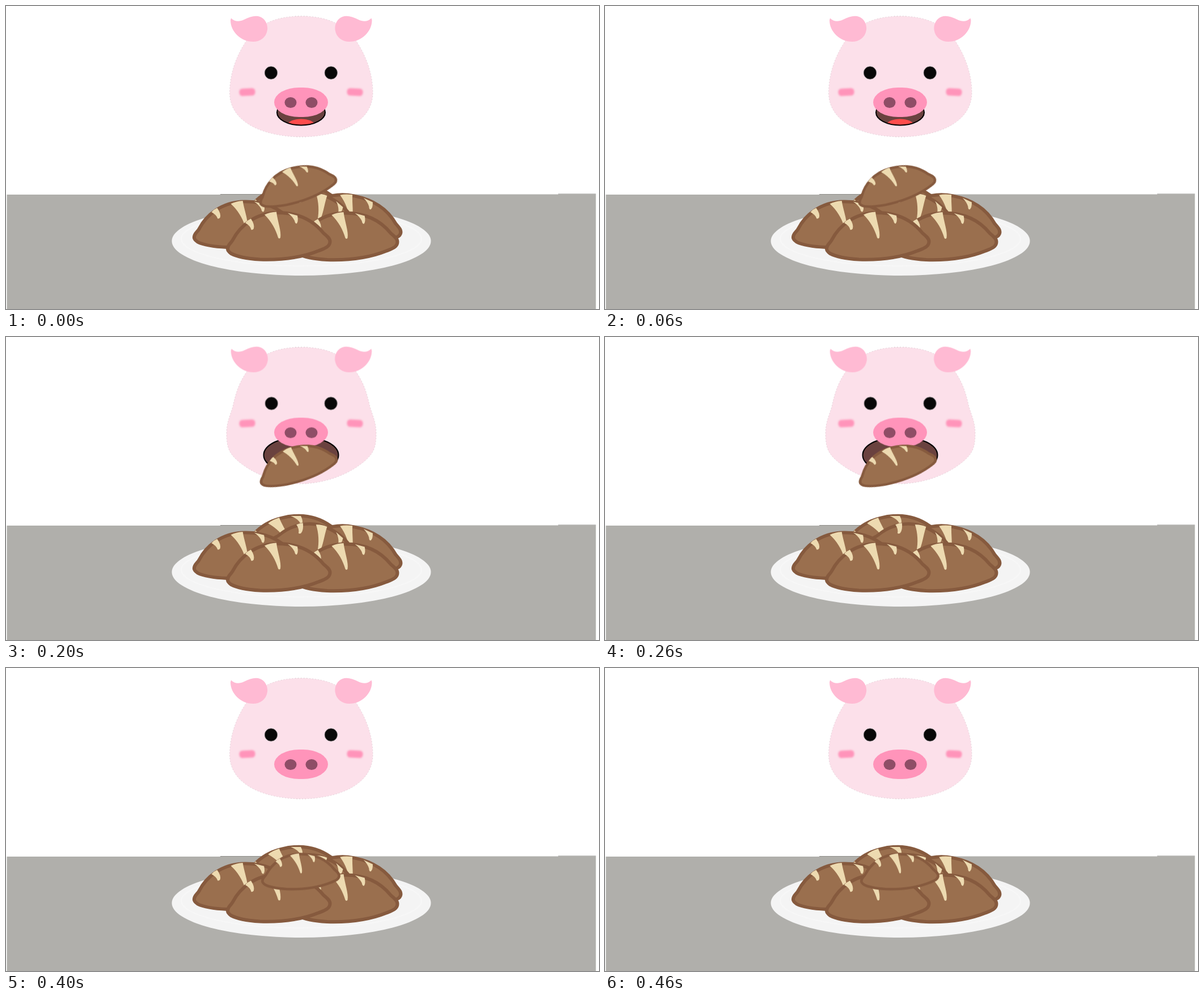
Recreate the animation shown at these times as an HTML page. Size 1046 px wide and 535 px high, loop 500 ms.

```html
<!DOCTYPE html>
<html lang="en">
<head>
<meta charset="utf-8">
<title>Hungry pig</title>
<style>
  html, body { margin: 0; width: 100%; height: 100%; overflow: hidden; background: #fff; }
  svg { display: block; width: 100%; height: 100%; }

  /* Poses: each .pose shows for one 100 ms slot, .rest closes the loop as well */
  .pose { opacity: 0; animation: slot 500ms step-end infinite; animation-delay: calc(var(--i) * 100ms - 500ms); }
  .rest { animation: rest 500ms step-end infinite; }
  .lift { animation: lift 500ms step-end infinite; }
  .left-in { animation: left-in 500ms step-end infinite; }
  .right-in { animation: right-in 500ms step-end infinite; }
  .cheeks { animation: cheeks 500ms step-end infinite; }
  .bread { transform-origin: 482px 411px; }
  .snack { animation: snack 500ms step-end infinite; }

  @keyframes slot { 0% { opacity: 1; } 20%, 100% { opacity: 0; } }
  @keyframes rest { 0% { opacity: 1; } 20% { opacity: 0; } 80%, 100% { opacity: 1; } }
  @keyframes lift { 0%, 80%, 100% { transform: none; } 20% { transform: translateY(-1.5px); } }
  @keyframes left-in { 0%, 80%, 100% { transform: none; } 20% { transform: translate(.7px, -.7px); } }
  @keyframes right-in { 0%, 80%, 100% { transform: none; } 20% { transform: translate(-.3px, -.7px); } }
  @keyframes cheeks { 0%, 80%, 100% { transform: none; } 20% { transform: translateY(.5px); } }
  @keyframes snack {
    0% { transform: translate(32px, -92.3px) rotate(-14deg) scale(.77, .735); }
    20% { transform: translate(30px, -136.3px) rotate(-14deg) scale(.77, .735); }
    40%, 60% { transform: translate(33px, -183.3px) rotate(-14deg) scale(.77, .735); }
    80%, 100% { transform: translate(38.5px, -48px) scale(.75); }
  }

  .skin { fill: #fce0ea; stroke: #b5a3ab; stroke-width: .6; stroke-dasharray: 2 3; stroke-opacity: .6; }
  .ear { fill: #ffbad3; }
  .eye { fill: #080808; stroke: #777; stroke-width: .7; }
  .cheek { fill: #ff94ba; filter: url(#soft); }
  .nostril { fill: #8f4d66; }
  .mouth { fill: #6a423f; }
  .lips { fill: none; stroke: #000; stroke-width: 2; }
  .tongue { fill: #ff4c4c; }
</style>
</head>
<body>
<svg viewBox="0 0 1046 535" preserveAspectRatio="none">
  <defs>
    <filter id="soft" x="-30%" y="-50%" width="160%" height="200%"><feGaussianBlur stdDeviation="1.7"/></filter>

    <g id="bread">
      <path fill="#9a6f4e" stroke="#865a3e" stroke-width="6" stroke-linejoin="round"
        d="M391 429C391 421 397 419 400 413C412 390 438 365 480 365C520 365 545 382 560 401C566 406 571.500 410 571.500 416C571.500 425 562 428 552 432C520 445 480 448.500 448 447.500C425 446 408 443 397 437C393 434 391 432 391 429Z"/>
      <g fill="#eddab0">
        <path d="M422 383Q426 378 432 375.500Q439 386 437 393Q435 396 432.500 395Q431 388 422 383Z"/>
        <path d="M456 368.500Q465 364 477 363.500C479 380 486 398 484 409Q482 412 480 409C476 395 468 380 456 368.500Z"/>
        <path d="M497 365.500L514 370Q516 380 513 384Q510 385 509 379Q505 371 497 365.500Z"/>
      </g>
    </g>

    <path id="half-rest" d="M510 18H521C570 18 600 35 618 62C637 91 647 122 647 153C647 208 582 231 521 231H510"/>
    <path id="half-1" d="M510 18H521C570 18 600 35 618 62C634 86 638 106 642 122C646 138 652 148 652 163C652 187 645 195 630 206C600 228 560 243 521 243H510"/>
    <path id="half-2" d="M510 18H521C570 18 600 35 618 62C634 86 638 106 642 123C647 140 653 151 653 170C653 195 648 205 635 217C605 244 560 259 521 259H510"/>
    <path id="half-3" d="M510 18H521C570 18 600 35 618 62C634 86 638 106 642 123C648 143 653 153 653 170C653 195 645 217 630 234C602 263 560 275 521 275H510"/>
    <path id="ear" d="M397 21.500C403 28 412 28 420 24C430 19 440 16 448 19C458 23 462 33 461 42C459 56 448 63 436 63C414 63 396 45 396 25Z"/>

    <ellipse id="m0" cx="520.500" cy="188" rx="42.500" ry="22.500"/>
    <ellipse id="m1" cx="520" cy="201" rx="55" ry="28"/>
    <ellipse id="m2" cx="520.500" cy="208.500" rx="66" ry="32.500"/>
    <ellipse id="m3" cx="521" cy="215" rx="77" ry="39.500"/>
    <clipPath id="c0"><use href="#m0"/></clipPath>
    <clipPath id="c1"><use href="#m1"/></clipPath>
    <clipPath id="c3"><use href="#m3"/></clipPath>
  </defs>

  <!-- Table and plate -->
  <path d="M1.500 333H378V332.400H1040.500V535H1.500Z" fill="#b0afab"/>
  <path d="M378 332.500H450M974 332H1040.500" stroke="#8f8e8a" stroke-width="1"/>
  <ellipse cx="521" cy="415" rx="228.500" ry="61" fill="#f4f4f4"/>
  <ellipse cx="521" cy="411" rx="212" ry="48" fill="none" stroke="#f7f7f7" stroke-width="2"/>

  <!-- Pile of bread -->
  <use class="bread" href="#bread" style="transform: translate(16px, -48.5px) rotate(-14deg) scale(1.02, .97)"/>
  <use class="bread" href="#bread" style="transform: translate(125.5px, -32.5px) rotate(11deg) scale(1.02, .95)"/>
  <use class="bread" href="#bread" style="transform: translate(68.5px, -31px) rotate(25deg) scale(.92, 1)"/>
  <use class="bread" href="#bread" style="transform: translate(-58.5px, -21px) rotate(-1deg) scale(1.01, .97)"/>
  <use class="bread" href="#bread" style="transform: translate(118.5px, .5px) scale(1.005, 1)"/>
  <use href="#bread"/>

  <!-- Head -->
  <g class="skin">
    <g class="rest"><use href="#half-rest"/><use href="#half-rest" transform="matrix(-1 0 0 1 1041.500 0)"/></g>
    <g class="pose" style="--i:1"><use href="#half-1"/><use href="#half-1" transform="matrix(-1 0 0 1 1041.500 0)"/></g>
    <g class="pose" style="--i:2"><use href="#half-2"/><use href="#half-2" transform="matrix(-1 0 0 1 1042 0)"/></g>
    <g class="pose" style="--i:3"><use href="#half-3"/><use href="#half-3" transform="matrix(-1 0 0 1 1042 0)"/></g>
  </g>
  <g class="left-in">
    <use class="ear" href="#ear"/>
    <circle class="eye" cx="467.500" cy="118" r="11.200"/>
  </g>
  <g class="right-in">
    <use class="ear" href="#ear" transform="matrix(-1 0 0 1 1041.500 0)"/>
    <circle class="eye" cx="573.300" cy="118" r="11.200"/>
  </g>
  <g class="cheeks">
    <rect class="cheek" x="411.500" y="145.500" width="28" height="13" rx="5.500" transform="rotate(-3 425.500 152)"/>
    <rect class="cheek" x="601.500" y="145.500" width="28" height="13" rx="5.500" transform="rotate(3 615.500 152)"/>
  </g>

  <!-- Mouth -->
  <g class="pose" style="--i:0">
    <use class="mouth" href="#m0"/>
    <g clip-path="url(#c0)"><ellipse class="tongue" cx="520.500" cy="209" rx="23" ry="9.500"/></g>
    <use class="lips" href="#m0"/>
  </g>
  <g class="pose" style="--i:1">
    <use class="mouth" href="#m1"/>
    <g clip-path="url(#c1)"><ellipse class="tongue" cx="520" cy="227" rx="31" ry="12"/></g>
    <use class="lips" href="#m1"/>
  </g>
  <g class="pose" style="--i:2">
    <use class="mouth" href="#m2"/>
    <use class="lips" href="#m2"/>
  </g>
  <g class="pose" style="--i:3">
    <use class="mouth" href="#m3"/>
    <g clip-path="url(#c3)"><ellipse class="tongue" cx="521" cy="252" rx="43" ry="16"/></g>
    <use class="lips" href="#m3" style="stroke-width:2.500"/>
  </g>

  <g class="lift">
    <rect x="473" y="144" width="95" height="52" rx="44" ry="26" fill="#ff94ba"/>
    <ellipse class="nostril" cx="502" cy="170.500" rx="10.500" ry="9.500"/>
    <ellipse class="nostril" cx="539" cy="170.500" rx="10.500" ry="9.500"/>
  </g>

  <use class="bread snack" href="#bread"/>
</svg>
</body>
</html>
```
